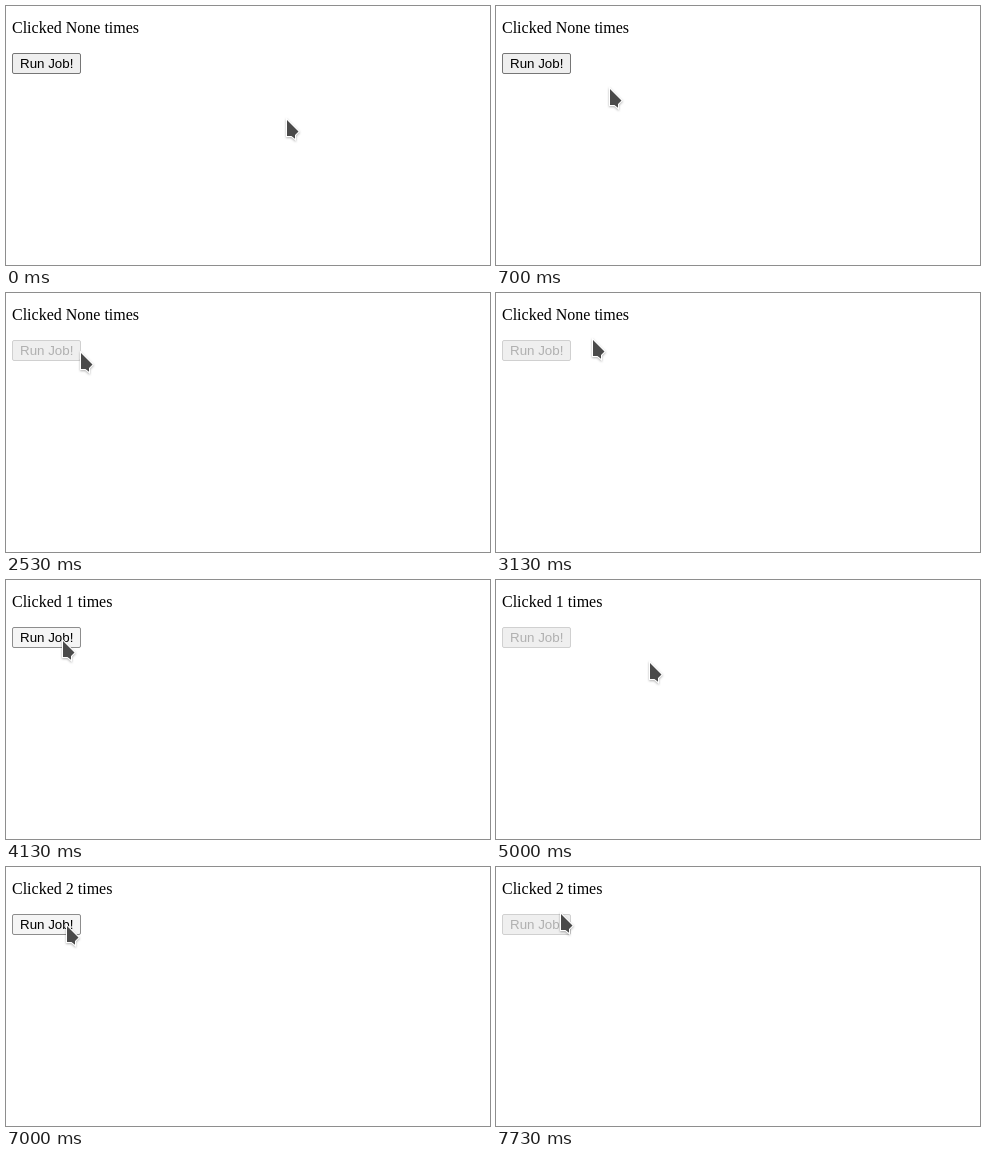
Recreate the animation shown at these times as an HTML page. Size 484x259 px, loop 8 s.

```html
<!DOCTYPE html>
<html lang="en">
<head>
<meta charset="utf-8">
<title>Run Job</title>
<style>
  html, body { margin: 0; width: 100%; height: 100%; overflow: hidden; background: #fff; }
  #status {
    position: absolute; left: 6px; top: 13px; white-space: pre;
    font: 16px/18px "Liberation Serif", serif; color: #000;
  }
  #run {
    position: absolute; left: 6px; top: 47px; width: 69px; height: 21px;
    box-sizing: border-box; padding: 2px 0 0 7px; white-space: nowrap;
    border: 1px solid #767676; border-radius: 2px; background: #efefef;
    font: 13.333px/15px "Liberation Sans", sans-serif; color: #000;
  }
  #run.hover { background: #e5e5e5; border-color: #4f4f4f; }
  #run.active { background: #f5f5f5; border-color: #8d8d8d; }
  #run.disabled { color: #b0b0b0; border-color: #d0d0d0; }
  #cursor {
    position: absolute; left: 0; top: 0; overflow: visible;
    filter: drop-shadow(0 1px 1px rgba(0, 0, 0, .3));
  }
</style>
</head>
<body>
<div id="status"></div>
<div id="run">Run Job!</div>
<svg id="cursor" width="14" height="21">
  <path d="M0 -1V15H4.5L8 17.8V14L11.5 10.5Z" fill="#4a4a4a" stroke="#fff" stroke-width="2" paint-order="stroke"/>
</svg>
<script>
const LOOP = 8000, FRAME = 100 / 3;
const HOLD = 130, JOB = 2040;  // ms the button is held, ms a job runs
const presses = [1030, 4130, 7000];

const label = document.getElementById("status");
const button = document.getElementById("run");
const cursor = document.getElementById("cursor");

// The pointer rests between moves.
const origin = { x: 281, y: 115 };
const move = (start, end, x, y) => ({ start, end, x, y });
const moves = [
  move(100, 300, 262, 128),
  move(300, 870, 51, 65),
  move(1430, 1570, 110, 63),
  move(2200, 2770, 50, 60),
  move(2900, 3165, 103, 46),
  move(3530, 3830, 57, 62),
  move(4230, 4630, 174, 90),
  move(4970, 5130, 66, 58),
  move(5780, 5930, 170, 63),
  move(6300, 6830, 61, 60),
  move(7200, 7400, 285, 76),
  move(7530, 7730, 65, 48)
];

function pointerAt(t) {
  return moves.reduce((from, { start, end, x, y }) => {
    const p = Math.min(Math.max((t - start) / (end - start), 0), 1);
    return { x: from.x + (x - from.x) * p, y: from.y + (y - from.y) * p };
  }, origin);
}

function buttonState(t, { x, y }) {
  const age = Math.min(...presses.filter(press => press <= t).map(press => t - press));
  if (age < HOLD) return "active";
  if (age < HOLD + JOB) return "disabled";
  return x >= 6 && x < 75 && y >= 47 && y < 68 ? "hover" : "";
}

function draw() {
  const frame = Math.floor((performance.now() % LOOP + 5) / FRAME);
  const t = frame * FRAME;
  const pointer = pointerAt(t);
  const done = presses.filter(press => t >= press + HOLD + JOB).length;
  label.textContent = `Clicked ${done || "None"} times`;
  button.className = buttonState(t, pointer);
  cursor.style.transform = `translate(${Math.round(pointer.x)}px, ${Math.round(pointer.y)}px)`;
  requestAnimationFrame(draw);
}
draw();
</script>
</body>
</html>
```
